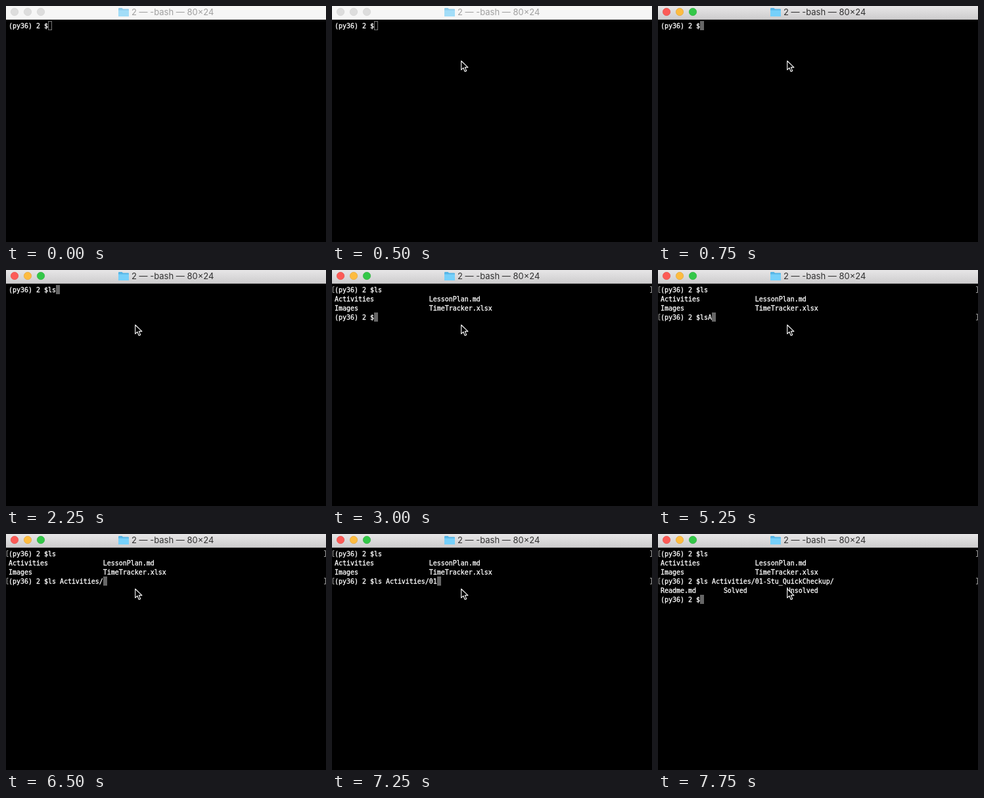
An HTML page for the animation above (8 s loop, 487x361 px).

```html
<!DOCTYPE html>
<html lang="en">
<head>
<meta charset="utf-8">
<title>Terminal</title>
<style>
  html, body { margin: 0; width: 100%; height: 100%; overflow: hidden; background: #000; }
  svg { display: block; width: 487px; height: 361px; }
  .mono { font: 9.967px "DejaVu Sans Mono", "Liberation Mono", monospace; fill: #fff; stroke: #fff; stroke-width: .3px; white-space: pre; }
  .title { font: 13px Inter, "Liberation Sans", sans-serif; }
</style>
</head>
<body>
<svg viewBox="0 0 487 361">
  <defs>
    <linearGradient id="bar" x1="0" y1="0" x2="0" y2="1">
      <stop offset="0" stop-color="#e7e6e7"/>
      <stop offset="1" stop-color="#cecdce"/>
    </linearGradient>
  </defs>
  <rect width="487" height="361"/>
  <rect id="titleBar" width="487" height="20"/>
  <rect id="barEdge" y="20" width="487" height="1"/>
  <g id="lights">
    <circle cx="13" cy="9" r="5.7"/>
    <circle cx="33" cy="9" r="5.7"/>
    <circle cx="53" cy="9" r="5.7"/>
  </g>
  <g id="folder">
    <path d="M171 4.2Q171 3 172.2 3H176.5L178 4.5H186Q187 4.5 187 5.5V14.8Q187 16 185.8 16H172.2Q171 16 171 14.8Z" fill="#56b5e6"/>
    <path d="M171 6.5H187V14.8Q187 16 185.8 16H172.2Q171 16 171 14.8Z" fill="#76d0fa"/>
  </g>
  <text id="title" class="title" x="191" y="14">2 — -bash — 80×24</text>
  <rect id="block"/>
  <g id="rows"></g>
  <g id="brackets" fill="none" stroke="#a0a0a0"></g>
  <path id="mouse" d="M.7 1V14.7L3.9 11.7L6.3 17.3L8.7 16.3L6.3 10.9H10.9Z" fill="#000" stroke="#fff" stroke-width="1.1" stroke-linejoin="round"/>
</svg>
<script>
const LOOP = 8000, ROW_H = 14, TOP = 23, LEFT = 4, COL_W = 6;
const NS = "http://www.w3.org/2000/svg";
const $ = id => document.getElementById(id);

const PROMPT = "(py36) 2 $";
const listing = [
  PROMPT + "ls",
  "Activities".padEnd(24) + "LessonPlan.md",
  "Images".padEnd(24) + "TimeTracker.xlsx"
];
const first = text => [PROMPT + text];
const second = text => [...listing, PROMPT + text];
const path = "ls Activities/01-Stu_QuickCheckup/";
const files = "Readme.md".padEnd(16) + "Solved".padEnd(16) + "Unsolved";

// Each entry holds until the next one; the block cursor ends the last line.
const screens = [
  [0, first("")],
  [2250, first("ls")],
  [2750, [PROMPT + "ls", ""]],
  [3000, second("")],
  [3750, second("ls")],
  [4250, second("lsA")],
  [4500, second("lsAc")],
  [5250, second("lsA")],
  [5500, second("ls")],
  [5750, second("ls ")],
  [6250, second("ls Ac")],
  [6500, second("ls Activities/")],
  [7000, second("ls Activities/0")],
  [7250, second("ls Activities/01")],
  [7500, second(path)],
  [7750, [...second(path), files, PROMPT]]
];
const pointer = [[0, null], [250, [273, 23]], [500, [196, 83]]];
const marks = [[0, []], [2750, [0]], [4750, [0, 3]]];

const at = (track, t) => track.filter(([start]) => start <= t).pop()[1];

function set(node, attrs) {
  for (const key in attrs) node.setAttribute(key, attrs[key]);
  return node;
}

function add(parent, tag, attrs) {
  return parent.appendChild(set(document.createElementNS(NS, tag), attrs));
}

const rows = Array.from({ length: 6 }, (_, i) =>
  add($("rows"), "text", { class: "mono", x: LEFT, y: TOP + i * ROW_H + 11 }));

const brackets = [0, 3].map(row => {
  const y = TOP + row * ROW_H + 2.5;
  const d = `M3.5 ${y}H1.5v9H3.5M484 ${y}H486.5v9H484`;
  return { row, node: add($("brackets"), "path", { d }) };
});

function paintWindow(active) {
  set($("titleBar"), { fill: active ? "url(#bar)" : "#f6f6f6" });
  set($("barEdge"), { fill: active ? "#b0afb0" : "#d8d8d8" });
  set($("title"), { fill: active ? "#303030" : "#a0a0a0" });
  set($("folder"), { opacity: active ? 1 : 0.65 });
  const fills = ["#fc5b57", "#fdbc40", "#33c748"];
  const edges = ["#e2463f", "#e0a032", "#25ab35"];
  [...$("lights").children].forEach((dot, i) => set(dot, {
    fill: active ? fills[i] : "#dddddd",
    stroke: active ? edges[i] : "#d0d0d0",
    "stroke-width": 0.6
  }));
}

function paintBlock(lines, active) {
  const last = lines.length - 1;
  const x = LEFT + lines[last].length * COL_W;
  const y = TOP + last * ROW_H;
  const inset = active ? 0 : 0.5;
  set($("block"), {
    x: x + inset, y: y + inset,
    width: COL_W - 2 * inset, height: ROW_H - 2 * inset,
    fill: active ? "#666" : "none",
    stroke: active ? "none" : "#777"
  });
}

function draw(t) {
  const active = t >= 750;
  const lines = at(screens, t);
  const shown = at(marks, t);
  const pos = at(pointer, t);
  paintWindow(active);
  paintBlock(lines, active);
  rows.forEach((row, i) => { row.textContent = lines[i] || ""; });
  brackets.forEach(({ row, node }) =>
    set(node, { visibility: shown.includes(row) ? "visible" : "hidden" }));
  set($("mouse"), {
    visibility: pos ? "visible" : "hidden",
    transform: `translate(${pos || "0,0"})`
  });
}

const start = performance.now();
function tick(now) {
  draw(Math.max(0, now - start) % LOOP);
  requestAnimationFrame(tick);
}
draw(0);
requestAnimationFrame(tick);
</script>
</body>
</html>
```
